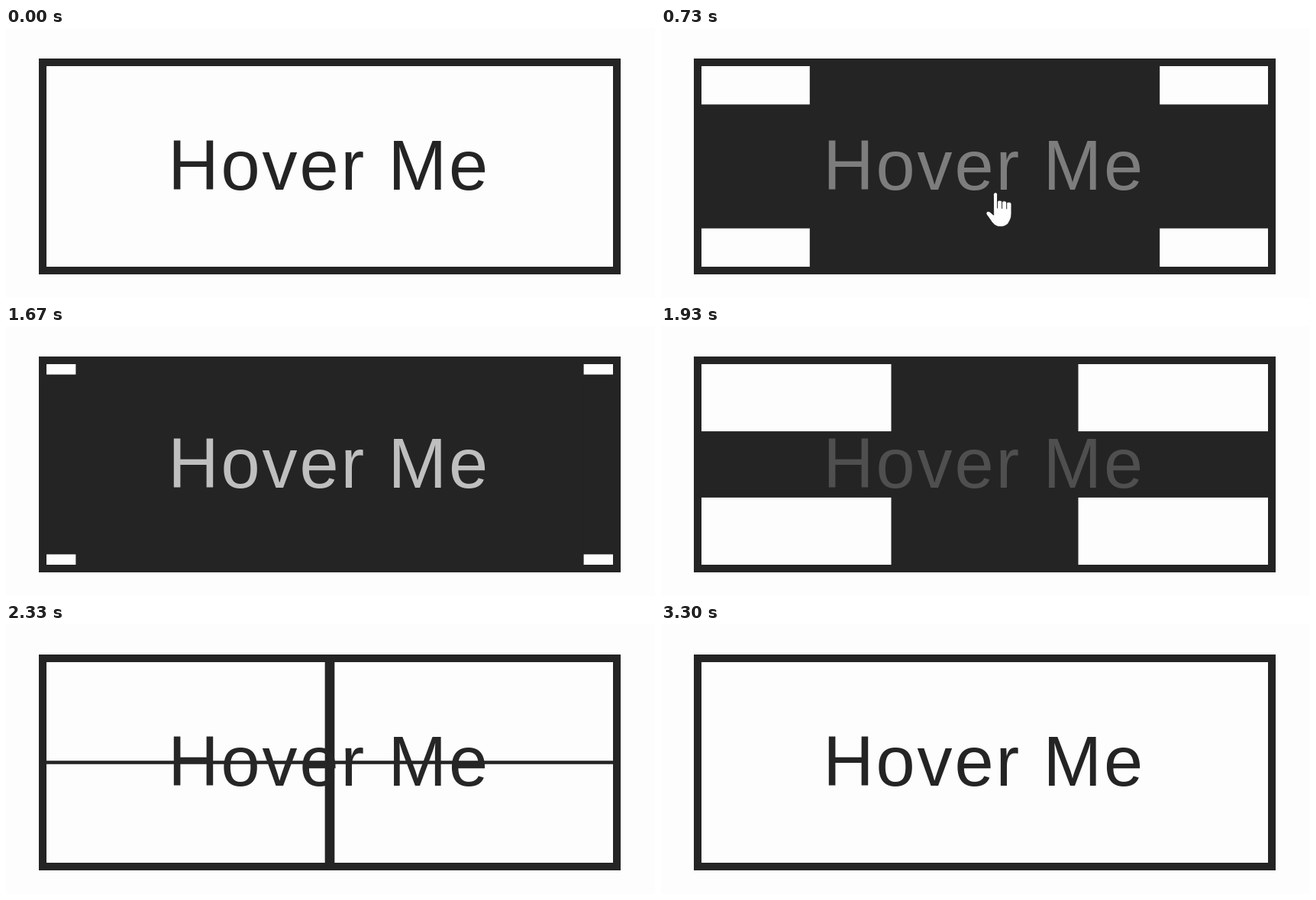
Write an HTML page that moves like this. It is 850 px wide and 354 px high and loops after 3330 ms.

```html
<!DOCTYPE html>
<html lang="en">
<head>
<meta charset="utf-8">
<title>Hover button</title>
<style>
  html, body { margin: 0; width: 100%; height: 100%; overflow: hidden; background: #fdfdfd; }
  svg { display: block; width: 850px; height: 354px; }
  .ink { fill: #242424; }
  text { font: 92px "Liberation Sans", Arial, sans-serif; letter-spacing: 2.9px; }
</style>
</head>
<body>
<svg viewBox="0 0 850 354">
  <rect x="48" y="45" width="752" height="273" fill="none" stroke="#242424" stroke-width="10"/>
  <rect class="ink" id="wide" x="53" width="742"/>
  <rect class="ink" id="tall" y="50" height="263"/>
  <text id="label" x="212.2" y="212">Hover Me</text>
  <g id="hand" stroke="#242424" stroke-linejoin="round" stroke-linecap="round">
    <path fill="#fff" d="M-2.6 2.2C-2.6-1.2 2.6-1.2 2.6 2.2V11.5C4 9.3 8.2 9.6 8.6 12.2
      C10.5 10 14.4 10.6 14.7 13.2C17 11.4 21 12 21 15.5V28C21 33 19 36 17.5 39
      C15 43 11 44.6 6 44.6C0 44.6-4 40-7 35L-11.5 28.8C-13.4 25.6-10 23.2-7 25.2L-2.6 29Z"/>
    <path fill="none" d="M2.6 11V20M8.6 12V20.5M14.7 13V21"/>
  </g>
</svg>
<script>
const LOOP = 3330;
const DARK = 36, LIGHT = 255;
const el = id => document.getElementById(id);
const wide = el('wide'), tall = el('tall'), label = el('label'), hand = el('hand');

// 0 to 1 over a span of time, held at both ends
const progress = (t, from, length) => Math.min(1, Math.max(0, (t - from) / length));

// CSS "ease": cubic-bezier(.25, .1, .25, 1), solved by bisection
function ease(x) {
  let lo = 0, hi = 1;
  for (let i = 0; i < 24; i++) {
    const u = (lo + hi) / 2;
    if (.75 * u * (1 - u) + u ** 3 < x) lo = u; else hi = u;
  }
  const v = 1 - lo;
  return x <= 0 ? 0 : x >= 1 ? 1 : .3 * v * v * lo + 3 * v * lo * lo + lo ** 3;
}

function draw(t) {
  // both bars grow from the centre on hover and shrink back afterwards
  const fill = ease(progress(t, 482, 696)) - ease(progress(t, 1575, 910));
  wide.setAttribute('y', 181.5 - 131.5 * fill);
  wide.setAttribute('height', 263 * fill);
  tall.setAttribute('x', 424 - 371 * fill);
  tall.setAttribute('width', 742 * fill);

  // the text lightens later than the bars grow
  const glow = 1 - Math.max(0, 1 - fill) ** .54;
  const grey = Math.round(DARK + (LIGHT - DARK) * glow);
  label.setAttribute('fill', `rgb(${grey}, ${grey}, ${grey})`);

  // the pointer slows down coming in and speeds up going out
  const away = (1 - progress(t, 440, 280)) ** 3 + progress(t, 1320, 280) ** 3;
  hand.setAttribute('transform', `translate(438 ${216 + 156 * away})`);
}

const start = performance.now();
function tick() {
  draw((performance.now() - start) % LOOP);
  requestAnimationFrame(tick);
}
tick();
</script>
</body>
</html>
```
